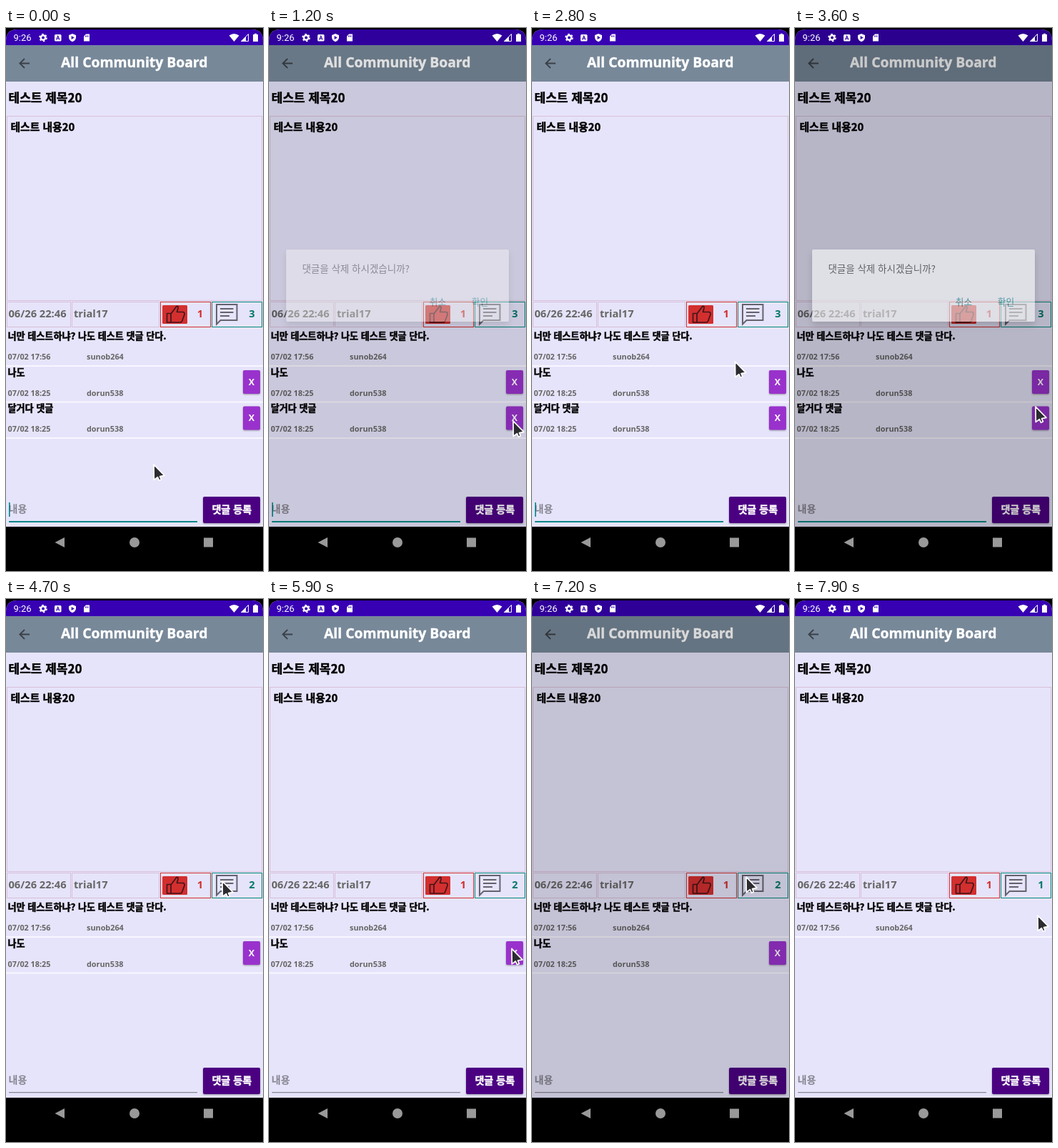
An HTML page for the animation above (8000 ms loop, 360x760 px).

```html
<!DOCTYPE html>
<html lang="ko">
<head>
<meta charset="utf-8">
<title>Community board</title>
<style>
  html, body { margin: 0; width: 100%; height: 100%; overflow: hidden; background: #000; }
  svg { display: block; width: 100%; height: 100%; }
  text { font-family: "Noto Sans CJK KR", "Noto Sans CJK JP", "Noto Sans CJK", sans-serif; white-space: pre; }
  .ko { font-weight: 900; stroke: #000; stroke-width: .45; }
  .la { font-family: "Noto Sans", "Open Sans", sans-serif; font-weight: 700; }
  .white { fill: #fff; stroke: #fff; stroke-width: .4; }
  .grey { fill: #666; }
  .mid { text-anchor: middle; }
  .frame { fill: none; stroke: #d8bfd8; }
  .raised { filter: drop-shadow(0 1.5px 1.2px rgba(0, 0, 0, .35)); }
  #dialog rect { filter: drop-shadow(0 5px 5px rgba(0, 0, 0, .25)); }
</style>
</head>
<body>
<svg viewBox="0 0 360 760" preserveAspectRatio="none">
  <clipPath id="screenShape"><path d="M0 698V18Q0 2 16 2H344Q360 2 360 18V698Z"/></clipPath>
  <g clip-path="url(#screenShape)">
    <rect width="360" height="698" fill="#e6e4fa"/>
    <rect width="360" height="24" fill="#3700b3"/>
    <rect y="24" width="360" height="51" fill="#778899"/>
    <path d="M33 49.5H19.5M26 43L19.3 49.5L26 56" fill="none" stroke="#3b4148" stroke-width="1.8"/>
    <text class="la white" x="77" y="55" font-size="19.35">All Community Board</text>
    <text class="ko" x="3.5" y="104" font-size="17">테스트 제목20</text>
    <rect class="frame" x="1.5" y="123.5" width="357" height="258"/>
    <text class="ko" x="6.5" y="144" font-size="14.8">테스트 내용20</text>

    <rect class="frame" x="1.5" y="383.5" width="89" height="35"/>
    <rect class="frame" x="92.5" y="383.5" width="122" height="35"/>
    <rect class="frame" x="216.5" y="383.5" width="70" height="35" style="stroke:#d32f2f"/>
    <rect class="frame" x="288.5" y="383.5" width="70" height="35" style="stroke:#00897b"/>
    <text class="la grey" x="3.5" y="405" font-size="14.65">06/26 22:46</text>
    <text class="la grey" x="95" y="405" font-size="14.65">trial17</text>
    <rect x="219" y="388" width="35" height="26" rx="1.5" fill="#d32f2f"/>
    <path d="M225.5 399.5H231V412H225.5ZM231 400L239 389.5Q241.5 389 241 392L239.5 397.5H248Q250.5 398 250 401L246.5 410.5Q246 412 244 412H231"
      fill="none" stroke="#42151a" stroke-width="1.7" stroke-linejoin="round"/>
    <text class="la mid" x="272" y="405" font-size="14.65" fill="#d32f2f">1</text>
    <path d="M295 414.5V387H323.5V409H300.5ZM300 393H318.5M300 398H318.5M300 403H313"
      fill="none" stroke="#64636e" stroke-width="2"/>
    <text id="count" class="la mid" x="344.5" y="405" font-size="14.65" fill="#00796b"></text>

    <g id="comments"></g>

    <text x="3.5" y="678" font-size="14" font-weight="700" fill="#85848f">내용</text>
    <rect id="underline" x="4" width="264"/>
    <rect id="caret" x="4" y="664" width="1.6" height="20" fill="#018786"/>
    <g class="raised"><rect x="276" y="656" width="80" height="37" rx="2" fill="#4b0082"/></g>
    <text class="ko white mid" x="316.3" y="678.5" font-size="14.1">댓글 등록</text>
    <rect id="dim" width="360" height="698"/>
  </g>

  <g fill="#fff">
    <text x="10.5" y="18" font-size="13" style="font-family:Roboto,sans-serif">9:26</text>
    <circle cx="52" cy="13.5" r="3.2" fill="none" stroke="#fff" stroke-width="2.4"/>
    <circle cx="52" cy="13.5" r="5" fill="none" stroke="#fff" stroke-width="1.6" stroke-dasharray="2.6 2.64"/>
    <rect x="68" y="9" width="9.5" height="9.5" rx="1.5"/>
    <path d="M70.5 16.5L72.7 11.2L75 16.5M71.3 15H74.2" fill="none" stroke="#3700b3" stroke-width="1.1"/>
    <path d="M93 8L98 10V13.5Q97.5 17.5 93 19.3Q88.5 17.5 88 13.5V10Z"/>
    <path d="M91.6 11V16L95.8 13.5Z" fill="#3700b3"/>
    <path d="M112 8.5H117V18.5H109V11.5Z"/>
    <path d="M111.5 10.5V12.5M113.3 10.5V12.5M115.1 10.5V12.5" stroke="#3700b3"/>
    <path d="M312.5 10.5Q319.5 5.5 326.5 10.5L319.5 19Z"/>
    <path d="M329.5 18.5L339.5 8.5V18.5Z" fill="none" stroke="#fff"/>
    <path d="M329 19L336 12V19Z"/>
    <path d="M346 9H348V7.7H351V9H353V19H346Z"/>
  </g>

  <g id="dialog">
    <rect x="24" y="310" width="312" height="101" rx="2" fill="#fff"/>
    <text x="46.4" y="342" font-size="13.5" fill="#212121">댓글을 삭제 하시겠습니까?</text>
    <g fill="#018786" font-size="12.7" font-weight="500">
      <text class="mid" x="236.5" y="388">취소</text>
      <text class="mid" x="295.5" y="388">확인</text>
    </g>
  </g>

  <rect y="698" width="360" height="62"/>
  <g fill="#999">
    <path d="M68.5 720L82 713V727Z"/>
    <circle cx="180" cy="720" r="7"/>
    <rect x="277" y="713.5" width="13" height="13"/>
  </g>

  <path id="cursor" d="M0 0L.3 21.5L5.4 17.6L7.6 22.3L10.4 21L8.6 16.6L15 15.4Z"
    fill="#2b2b30" stroke="#fff" stroke-width="1.7" stroke-linejoin="round"/>
</svg>
<script>
const LOOP = 8000, STEP = 100;
const byId = id => document.getElementById(id);
const clamp = v => Math.min(1, Math.max(0, v));

const comments = [
  { text: '너만 테스트하냐? 나도 테스트 댓글 단다.', date: '07/02 17:56', user: 'sunob264', until: LOOP },
  { text: '나도', date: '07/02 18:25', user: 'dorun538', until: 7700, own: true },
  { text: '달거다 댓글', date: '07/02 18:25', user: 'dorun538', until: 4700, own: true }
];

byId('comments').innerHTML = comments.map((c, i) => `
  <g transform="translate(0 ${i * 50.5})">
    <text class="ko" x="2.5" y="436.3" font-size="13.1">${c.text}</text>
    <text class="la grey" x="2.5" y="464" font-size="10.85">${c.date}</text>
    <text class="la grey" x="113" y="464" font-size="10.85">${c.user}</text>
    <rect y="472" width="360" height="2" fill="#f8f7ff"/>
    ${c.own ? `<g class="raised"><rect x="332" y="428.5" width="24" height="33" rx="2" fill="#9932cc"/></g>
    <text class="la mid" x="344" y="449" font-size="12.5" fill="#fff">X</text>` : ''}
  </g>`).join('');
const rows = [...byId('comments').children];

// Pointer stops: time, x, y
const stops = [
  [0, 207, 611], [50, 207, 611], [200, 212, 607], [300, 212, 607], [1050, 342, 550],
  [1250, 342, 550], [2300, 228, 388], [2600, 228, 388], [3000, 341, 546], [3300, 338, 541],
  [3400, 338, 541], [3600, 337, 530], [3880, 303, 395], [4700, 303, 395], [5800, 340, 489],
  [6300, 340, 493], [6500, 294, 479], [6950, 300, 389], [7300, 300, 389], [7900, 340, 443], [LOOP, 340, 443]
];
const dialogs = [[1155, 2600], [3525, 3890], [6395, 7050]];
const caretTimes = [[0, 400], [900, 3200], [3900, 4700]];
const within = (t, [from, to]) => t >= from && t < to;

function pointerAt(t) {
  const i = stops.findIndex((s, n) => n && t < s[0]);
  const [t0, x0, y0] = stops[i - 1], [t1, x1, y1] = stops[i];
  const u = (t - t0) / (t1 - t0), e = u * u * (3 - 2 * u);
  return [x0 + (x1 - x0) * e, y0 + (y1 - y0) * e];
}

function dialogAt(t) {
  let alpha = 0, dim = 0;
  for (const [open, close] of dialogs) {
    const u = clamp((t - open) / 220);
    alpha += (1 - (1 - u) ** 2) * (1 - clamp((t - close) / 150));
    dim += 0.6 * u * (1 - clamp((t - close) / 200));
  }
  return { alpha, dim };
}

function render(t) {
  const { alpha, dim } = dialogAt(t);
  byId('dialog').style.opacity = alpha;
  byId('dim').style.opacity = dim;

  const visible = comments.map(c => t < c.until);
  rows.forEach((row, i) => row.style.display = visible[i] ? '' : 'none');
  byId('count').textContent = visible.filter(Boolean).length;

  const focused = t < 4700, line = byId('underline');
  line.setAttribute('y', focused ? 690 : 690.2);
  line.setAttribute('height', focused ? 2 : 1);
  line.setAttribute('fill', focused ? '#018786' : '#716f7a');
  byId('caret').style.opacity = caretTimes.some(span => within(t, span)) ? 1 : 0;

  byId('cursor').setAttribute('transform', `translate(${pointerAt(t)})`);
}

const start = performance.now();
function tick() {
  const t = (performance.now() - start) % LOOP;
  render(Math.floor(t / STEP) * STEP);
  requestAnimationFrame(tick);
}
tick();
</script>
</body>
</html>
```
